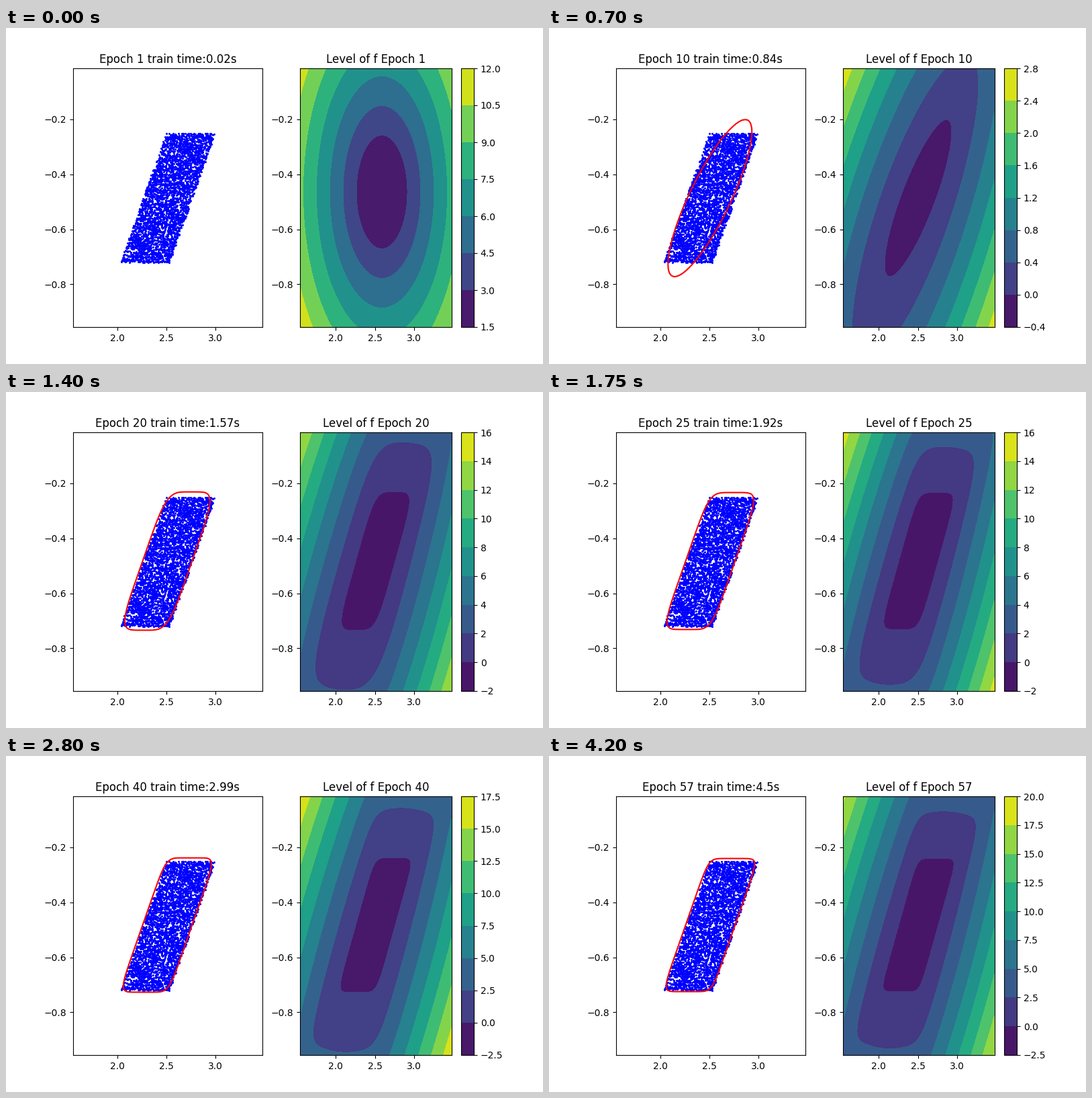
Animation, 800 px wide and 500 px high, one loop 4550 ms. Source, as a matplotlib script:

```python
import numpy as np
import matplotlib.pyplot as plt
from matplotlib.animation import FuncAnimation

XLIM = (1.5445, 3.479)
YLIM = (-0.9555, -0.0142)
FRAME_MS = 350

# epoch, train time, level step, first and last level counted in steps
STAGES = [
    (1, 0.02, 1.5, 1, 8),
    (5, 0.4, 0.15, -3, 3),
    (10, 0.84, 0.4, -1, 7),
    (15, 1.21, 1.5, -1, 6),
    (20, 1.57, 2, -1, 8),
    (25, 1.92, 2, -1, 8),
    (30, 2.26, 2, -1, 8),
    (35, 2.62, 2.5, -1, 7),
    (40, 2.99, 2.5, -1, 7),
    (45, 3.4, 2.5, -1, 8),
    (50, 3.88, 2.5, -1, 8),
    (55, 4.33, 2.5, -1, 8),
    (57, 4.5, 2.5, -1, 8),
]

# The level panel in stage pixels, and the same grid in data units
N = 160
PX, PY = np.meshgrid(np.linspace(438.2, 663.6, N), np.linspace(445, 60, N))
GX, GY = np.meshgrid(np.linspace(*XLIM, N), np.linspace(*YLIM, N))


def bowl(center, half, slope, shear=0, power=2, bend=(0, 0, 0, 0, 0)):
    """Cone over a sheared superellipse, bent by a quadratic outside its rim."""
    dx, dy = PX - center[0], PY - center[1]
    u = np.abs(dx + shear * dy) / half[0]
    v = np.abs(dy) / half[1]
    r = (u ** power + v ** power) ** (1 / power)

    x, y = dx / 100, dy / 100
    bx, by, bxx, bxy, byy = bend
    q = bx * x + by * y + bxx * x * x + bxy * x * y + byy * y * y
    return slope * (r - 1) + q * (1 - 1 / np.maximum(r, 1) ** 2)


def late(epoch):
    """The rim sharpens into a parallelogram while the walls get steeper."""
    ease = 1 - np.exp(-(epoch - 20) / 18)
    f = bowl((550.5, 251.5), (29.5, 103 - 4.5 * ease), 2.42, 0.28,
             5 + 4 * ease, (0.05, -0.18, 2.05, 0.92, 0.33))
    return (0.82 + 0.27 * ease) * f


FIRST = 3 + bowl((560, 244), (38, 84.4), 2.87)
TENTH = bowl((550, 253), (27, 117), 0.257, 0.36,
             bend=(0, -0.035, 0.42, 0.18, 0.055))


def level_field(epoch):
    if epoch == 1:
        return FIRST
    if epoch == 5:
        return 0.1 * TENTH + 0.06 * FIRST - 0.565
    if epoch == 10:
        return TENTH
    if epoch == 15:
        return 0.5 * (TENTH + late(20))
    return late(epoch)


rng = np.random.default_rng(4)
t, v = rng.random((2, 3500))
CLOUD_X = 2.029 + 0.502 * t + 0.466 * v
CLOUD_Y = -0.7207 + 0.4707 * v

fig = plt.figure(figsize=(8, 5), dpi=100)


def style(ax, title):
    ax.set_xlim(XLIM)
    ax.set_ylim(YLIM)
    ax.set_xticks([2.0, 2.5, 3.0])
    ax.set_yticks([-0.8, -0.6, -0.4, -0.2])
    ax.set_title(title)


def draw(i):
    epoch, secs, step, lo, hi = STAGES[i]
    levels = step * np.arange(lo, hi + 1)
    f = level_field(epoch)
    fig.clear()
    left, right = fig.subplots(1, 2)

    left.scatter(CLOUD_X, CLOUD_Y, s=1.5, color="blue")
    if lo < 0:
        left.contour(GX, GY, f, levels=[0], colors="red")
    style(left, f"Epoch {epoch} train time:{secs}s")

    margin = 0.01 * step
    shown = np.clip(f, levels[0] + margin, levels[-1] - margin)
    filled = right.contourf(GX, GY, shown, levels=levels)
    fig.colorbar(filled, ax=right)
    style(right, f"Level of f Epoch {epoch}")
    return []


anim = FuncAnimation(fig, draw, frames=len(STAGES), init_func=lambda: draw(0),
                     interval=FRAME_MS, repeat=True, repeat_delay=0, blit=False)
plt.show()
```
